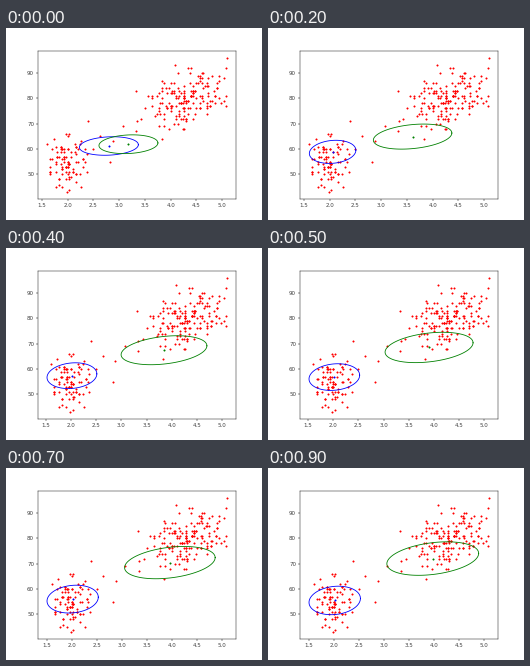
Recreate the animation shown at these times as a matplotlib script. Size 256x192 px, loop 1000 ms.

```python
import numpy as np
import matplotlib.pyplot as plt
from matplotlib.animation import FuncAnimation

FRAMES = 10
X_MIN, X_MAX = 1.6, 5.1
Y_MIN, Y_MAX = 43, 96

# Points that fix the limits of the data and the gap between the clusters.
EDGE_POINTS = [(1.6, 62), (1.98, 43), (2.39, 71), (2.63, 65), (2.88, 63),
               (2.83, 55), (3.07, 69), (3.32, 83), (3.34, 71), (3.83, 64),
               (4.08, 93), (5.1, 96)]


def settle(frame, start, end, rate, kick=0):
    """Decay from start to end, like a damped spring with an initial kick."""
    return end + (start - end + kick * frame) * rate**frame


# Each parameter follows settle(start, end, rate, kick).
BLUE = dict(cx=(2.8, 2.02, .22), cy=(61.2, 54.5, .81),
            width=(.572, .512, .38, -.24), height=(3.65, 5.8, .76),
            tilt=(.14, .14, 1))
GREEN = dict(cx=(3.18, 3.98, .5, -.34), cy=(61.9, 80, .913),
             width=(.572, .925, .68), height=(3.7, 7, .79),
             tilt=(.14, .31, .4))


def cluster(rng, count, mean, sd, corr, low, high):
    """Correlated normal points on a grid, kept inside a box."""
    u, v = rng.normal(size=(2, 10 * count))
    x = mean[0] + sd[0] * u
    y = mean[1] + sd[1] * (corr * u + np.sqrt(1 - corr**2) * v)
    points = np.column_stack([np.round(x * 30) / 30, np.round(y)])
    inside = np.all((points >= low) & (points <= high), axis=1)
    return points[inside][:count]


def outline(cx, cy, width, height, tilt):
    t = np.linspace(0, 2 * np.pi, 121)
    return cx + width * np.cos(t), cy + height * np.sin(t + np.arcsin(tilt))


rng = np.random.default_rng(7)
points = np.vstack([
    EDGE_POINTS,
    cluster(rng, 92, (2.0, 54.5), (.25, 6), .15, (1.65, 44), (2.55, 67)),
    cluster(rng, 168, (4.3, 80), (.42, 6), .38, (3.33, 66), (5.07, 93)),
])

fig, ax = plt.subplots(figsize=(6.4, 4.8), dpi=40)
ax.tick_params(labelcolor="0.25")
ax.plot(*points.T, "r.", markersize=5, snap=False)
shapes = []
for motion, color in ((BLUE, "b"), (GREEN, "g")):
    curve, = ax.plot([], [], color=color)
    centre, = ax.plot([], [], ".", color=color, markersize=5, snap=False)
    shapes.append((motion, curve, centre))
y_pad = .05 * (Y_MAX - Y_MIN)
ax.set_ylim(Y_MIN - y_pad, Y_MAX + y_pad)


def update(frame):
    left = X_MIN
    for motion, curve, centre in shapes:
        pose = {name: settle(frame, *path) for name, path in motion.items()}
        curve.set_data(*outline(**pose))
        centre.set_data([pose["cx"]], [pose["cy"]])
        left = min(left, pose["cx"] - pose["width"])
    pad = .05 * (X_MAX - left)
    ax.set_xlim(left - pad, X_MAX + pad)
    return [artist for shape in shapes for artist in shape[1:]]


animation = FuncAnimation(fig, update, frames=FRAMES, interval=100, repeat=True)
plt.show()
```
